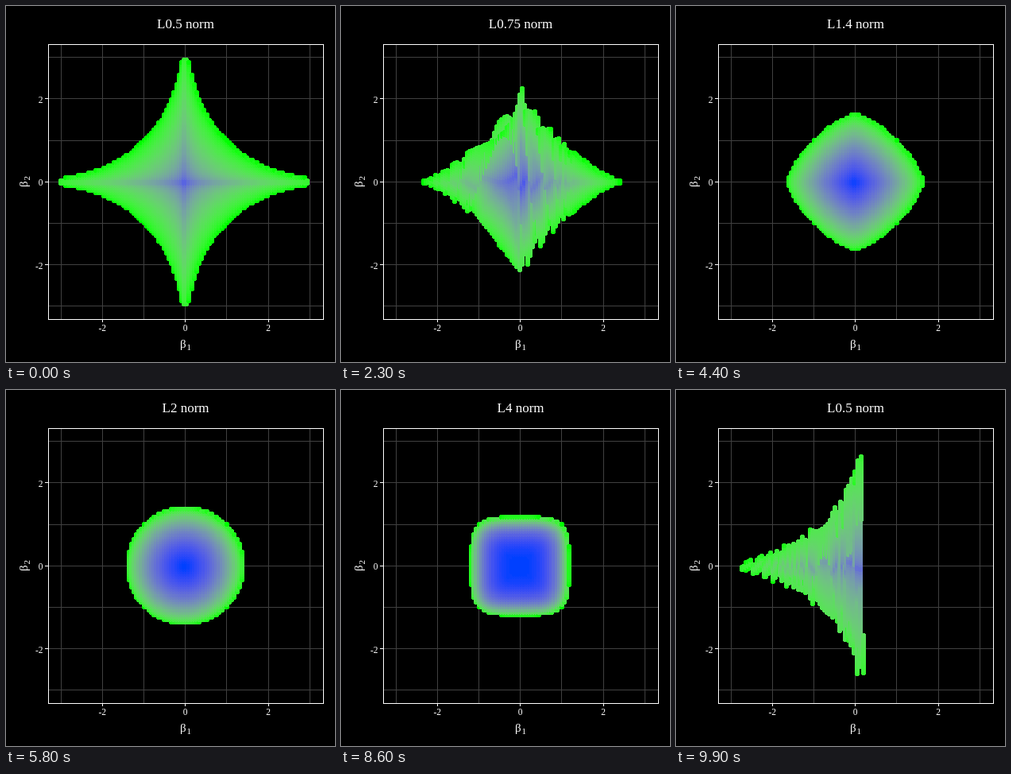
An HTML page with a canvas for the animation above (10000 ms loop, 414 by 448 pixels).

```html
<!DOCTYPE html>
<html lang="en">
<head>
<meta charset="utf-8">
<title>Lp norm balls</title>
<style>
  html, body { margin: 0; width: 100%; height: 100%; overflow: hidden; background: #000; }
  canvas { display: block; width: 414px; height: 448px; }
</style>
</head>
<body>
<canvas id="stage" width="414" height="448"></canvas>
<script>
const ctx = document.getElementById('stage').getContext('2d');
const SERIF = '"Liberation Serif", "Times New Roman", serif';
const LOOP = 10000, TICK = 100, STEPS = 7;
const POWERS = [0.5, 0.75, 1, 1.4, 2, 3, 4];
const STARTS = [800, 2300, 3800, 5200, 6600, 8000, 9400];
const UNIT = 52.2, CX = 225.7, CY = 221.2;
const px = x => CX + x * UNIT;
const py = y => CY - y * UNIT;

// Grid points inside |x|^p + |y|^p <= 2, column by column.
const coord = i => (2 * i - 99) / 33;
function ball(p) {
  const points = [];
  for (let i = 0; i < 99; i++) {
    for (let j = 1; j < 99; j++) {
      const x = coord(i), y = coord(j);
      const v = Math.abs(x) ** p + Math.abs(y) ** p;
      if (v <= 2 + 1e-9) points.push({ x, y, v });
    }
  }
  return points;
}
const balls = POWERS.map(ball);

// Colour ramp, mixed in Lab.
const WHITE = [0.95047, 1, 1.08883];
function toLab(rgb) {
  const [r, g, b] = rgb.map(c => (c /= 255) <= 0.04045 ? c / 12.92 : ((c + 0.055) / 1.055) ** 2.4);
  const [x, y, z] = [
    0.4124 * r + 0.3576 * g + 0.1805 * b,
    0.2126 * r + 0.7152 * g + 0.0722 * b,
    0.0193 * r + 0.1192 * g + 0.9505 * b
  ].map((c, i) => (c /= WHITE[i]) > 0.008856 ? Math.cbrt(c) : 7.787 * c + 16 / 116);
  return [116 * y - 16, 500 * (x - y), 200 * (y - z)];
}
function toCss([L, a, b]) {
  const fy = (L + 16) / 116;
  const [x, y, z] = [fy + a / 500, fy, fy - b / 200]
    .map((f, i) => WHITE[i] * (f > 0.2069 ? f ** 3 : (f - 16 / 116) / 7.787));
  const rgb = [
    3.2406 * x - 1.5372 * y - 0.4986 * z,
    -0.9689 * x + 1.8758 * y + 0.0415 * z,
    0.0557 * x - 0.204 * y + 1.057 * z
  ].map(c => {
    c = Math.min(1, Math.max(0, c));
    return Math.round(255 * (c <= 0.0031308 ? 12.92 * c : 1.055 * c ** (1 / 2.4) - 0.055));
  });
  return `rgb(${rgb})`;
}
const mix = (a, b, t) => a + (b - a) * t;
const LOW = toLab([0, 64, 255]), HIGH = toLab([0, 255, 0]);
const ramp = Array.from({ length: 256 }, (_, i) => toCss(LOW.map((c, k) => mix(c, HIGH[k], i / 255))));

function dot(x, y, v) {
  const X = Math.round(px(x)), Y = Math.round(py(y));
  ctx.fillStyle = ramp[Math.min(255, Math.round(v * 127.5))];
  ctx.fillRect(X - 2, Y - 3, 4, 6);
  ctx.fillRect(X - 3, Y - 2, 6, 4);
}

function text(str, x, y, size, align = 'center') {
  ctx.font = `${size}px ${SERIF}`;
  ctx.textAlign = align;
  ctx.fillText(str, x, y);
}

function beta(sub, x, y, turn) {
  ctx.save();
  ctx.translate(x, y);
  ctx.rotate(turn);
  text('β', -7, 0, 15, 'left');
  text(sub, 1.5, 3, 11, 'left');
  ctx.restore();
}

function drawGrid() {
  ctx.fillStyle = '#000';
  ctx.fillRect(0, 0, 414, 448);
  ctx.fillStyle = '#404040';
  for (let k = -3; k <= 3; k++) {
    ctx.fillRect(Math.floor(px(k)), 48, 1, 346);
    ctx.fillRect(53, Math.floor(py(k)), 346, 1);
  }
}

function drawFrame(title) {
  ctx.strokeStyle = ctx.fillStyle = '#fff';
  ctx.lineWidth = 1;
  ctx.strokeRect(53.5, 48.5, 346, 346);
  for (const k of [-2, 0, 2]) {
    ctx.fillRect(Math.floor(px(k)), 394, 1, 4);
    ctx.fillRect(49, Math.floor(py(k)), 4, 1);
    text(k, px(k), 409, 11.5);
    text(k, 46.5, py(k) + 5, 11.5, 'right');
  }
  text(title, 226, 28, 17);
  beta('1', 226, 430, 0);
  beta('2', 27, 221, -Math.PI / 2);
}

// State pair and progress at a given time.
function poseAt(ms) {
  let i = STARTS.length - 1;
  while (i >= 0 && ms < STARTS[i]) i--;
  if (i < 0) return { from: 0, to: 0, t: 1 };
  const step = Math.floor((ms - STARTS[i]) / TICK) + 1;
  return { from: i, to: (i + 1) % POWERS.length, t: Math.min(1, step / STEPS) };
}

function draw(ms) {
  const { from, to, t } = poseAt(ms);
  const a = balls[from], b = balls[to];
  drawGrid();
  if (t === 1) {
    b.forEach(p => dot(p.x, p.y, p.v));
  } else {
    // Points pair up by index; those without a partner stay put.
    a.forEach((p, i) => {
      const q = b[i] || p;
      dot(mix(p.x, q.x, t), mix(p.y, q.y, t), mix(p.v, q.v, t));
    });
  }
  drawFrame(`L${POWERS[t < 0.5 ? from : to]} norm`);
}

let shown = -1;
const begin = performance.now();
function loop() {
  const tick = Math.floor(((performance.now() - begin) % LOOP) / TICK);
  if (tick !== shown) draw((shown = tick) * TICK);
  requestAnimationFrame(loop);
}
loop();
</script>
</body>
</html>
```
